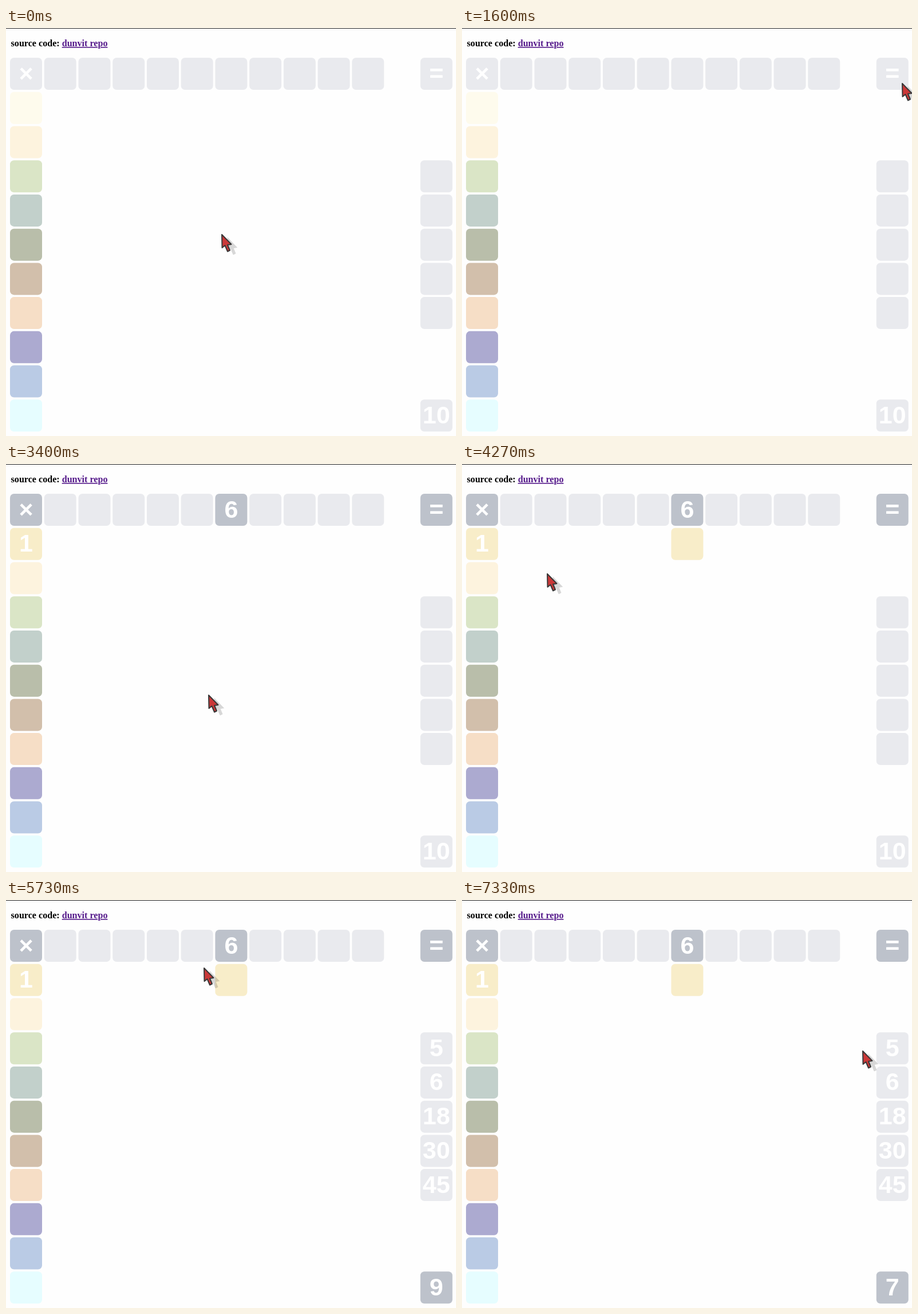
An HTML page that plays this animation: 786x713 px, repeating every 8 s.

```html
<!DOCTYPE html>
<html lang="en">
<head>
<meta charset="utf-8">
<title>Times table</title>
<style>
html, body { margin: 0; width: 100%; height: 100%; overflow: hidden; background: #fefefe; }
svg { display: block; width: 786px; height: 713px; }
.title { font: bold 16.1px "Liberation Serif", "Times New Roman", serif; }
.link { fill: #551a8b; text-decoration: underline; }
.num { font: bold 43px "Liberation Sans", Arial, sans-serif; fill: #fff; text-anchor: middle; }
</style>
</head>
<body>
<svg viewBox="0 0 786 713">
  <rect width="786" height="1" fill="#222"/>
  <text class="title" x="8.6" y="32">source code: <tspan class="link">dunvit repo</tspan></text>
  <g id="board"></g>
  <g id="cursor" stroke-linejoin="round">
    <path d="M2 2 2.5 25 7.5 21 12 31.5 16 29.5 12 20 18.5 19Z" transform="translate(10 5.5)"
      fill="#000" stroke="#000" opacity=".15" style="filter: blur(.7px)"/>
    <path d="M2 2 2.5 25 7.5 21 12 31.5 16 29.5 12 20 18.5 19Z" fill="#cb3838" stroke="#3a3838" stroke-width="2"/>
  </g>
</svg>
<script>
const FPS = 15, LOOP = 8000, PITCH = 59.73;
const DIM = '#e9eaee', LIT = '#bdc2cb', YELLOW = '#f8edc9';
const board = document.getElementById('board');
const cursor = document.getElementById('cursor');

function add(tag, attrs) {
  const el = document.createElementNS('http://www.w3.org/2000/svg', tag);
  for (const key in attrs) el.setAttribute(key, attrs[key]);
  return board.appendChild(el);
}

function cell(col, row, color, label = '') {
  const x = 7 + col * PITCH, y = 52 + row * PITCH;
  const box = add('rect', { x, y, width: 56, height: 56, rx: 7, fill: color });
  const text = add('text', { x: x + 28, y: y + 41.5, class: 'num' });
  text.textContent = label;
  return (fill, str) => {
    box.setAttribute('fill', fill);
    if (text.textContent !== str) text.textContent = str;
  };
}

const times = cell(0, 0, DIM, '×');
const heads = Array.from({ length: 10 }, (_, i) => cell(i + 1, 0, DIM));
const rows = ['#fefbed', '#fdf3de', '#dae5c6', '#c2d0cb', '#b9beaa',
  '#d2bfab', '#f6dec6', '#acaad0', '#bacbe5', '#e6fdff'].map((c, i) => cell(0, i + 1, c));
const equals = cell(12, 0, DIM, '=');
const answers = [5, 6, 18, 30, 45];
const choices = answers.map((_, i) => cell(12, i + 3, DIM));
const product = cell(6, 1, 'none');
const timer = cell(12, 10, DIM, '10');

// Cursor moves: first tick, tick count, destination, then a point passed at a given step
const start = [375, 359];
const moves = [
  { at: 15, n: 10, to: [767, 95] },
  { at: 42, n: 10, to: [352, 402], via: [504, 286], step: 5 },
  { at: 61, n: 8, to: [66, 148], via: [147, 190], step: 4 },
  { at: 75, n: 12, to: [344, 117], via: [238, 123], step: 5 },
  { at: 97, n: 13, to: [696.5, 261], via: [488, 176], step: 5 },
  { at: 110, n: 1, to: [698, 262] }
];
const smooth = s => s * s * (3 - 2 * s);

function cursorAt(tick) {
  let from = start;
  for (const { at, n, to, via, step } of moves) {
    if (tick < at) break;
    const s = smooth(Math.min(1, (tick - at + 1) / n)), origin = from;
    from = to.map((end, i) => {
      const span = end - origin[i];
      const bend = via ? Math.log((via[i] - origin[i]) / span) / Math.log(smooth(step / n)) : 1;
      return origin[i] + span * s ** bend;
    });
  }
  return from;
}

function draw(now) {
  const tick = Math.floor(now % LOOP * FPS / 1000 + 0.06);
  const shade = from => tick >= from ? LIT : DIM;
  equals(shade(35), '=');
  rows[0](tick >= 35 ? YELLOW : '#fefbed', tick >= 35 ? '1' : '');
  times(shade(42), '×');
  heads[5](shade(50), tick >= 50 ? '6' : '');
  product(tick >= 57 ? YELLOW : 'none', '');
  choices.forEach((set, i) => set(DIM, tick >= 65 ? String(answers[i]) : ''));
  timer(shade(65), String(10 - Math.max(0, Math.floor((tick - 65) / FPS))));
  cursor.setAttribute('transform', `translate(${cursorAt(tick)})`);
}

const begin = performance.now();
function loop() {
  draw(performance.now() - begin);
  requestAnimationFrame(loop);
}
loop();
</script>
</body>
</html>
```
